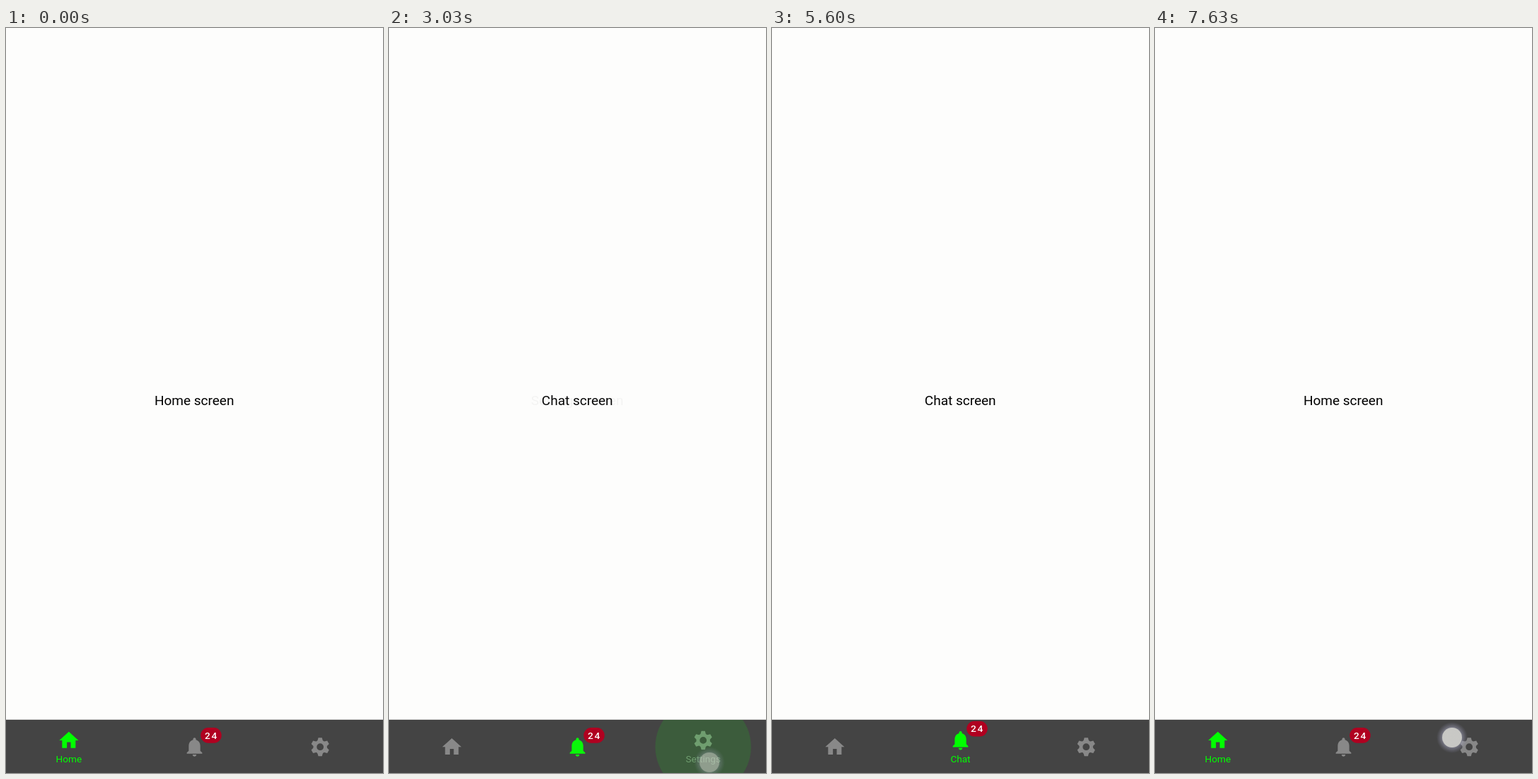
An HTML page for the animation above (7660 ms loop, 533 by 1051 pixels).

```html
<!DOCTYPE html>
<html lang="en">
<head>
<meta charset="utf-8">
<title>Bottom navigation</title>
<style>
  html, body { margin: 0; width: 100%; height: 100%; overflow: hidden; background: #fdfdfc; }
  svg { display: block; width: 533px; height: 1051px; font-family: Roboto, sans-serif; text-anchor: middle; }
  .screen { font-size: 19px; }
  .label { font-size: 13.57px; }
  .badge { font-size: 13.57px; font-weight: 500; letter-spacing: 1.7px; fill: #fff; text-anchor: start; }
</style>
</head>
<body>
<svg viewBox="0 0 533 1051">
  <defs>
    <clipPath id="bar"><rect y="976" width="533" height="75"/></clipPath>
    <radialGradient id="halo">
      <stop offset=".55" stop-color="#b4b4cc" stop-opacity=".6"/>
      <stop offset="1" stop-color="#9090b0" stop-opacity="0"/>
    </radialGradient>
    <path id="tooth" d="M10.1 2.4h3.8l.85 3-1 2h-3.5l-1-2z"/>
    <path id="icon0" d="M10 20v-6h4v6h5v-8h3L12 3 2 12h3v8z"/>
    <path id="icon1" d="M12 22c1.1 0 2-.9 2-2h-4c0 1.1.9 2 2 2zm6-6v-5c0-3.07-1.64-5.64-4.5-6.32V4c0-.83-.67-1.5-1.5-1.5s-1.5.67-1.5 1.5v.68C7.63 5.36 6 7.92 6 11v5l-2 2v1h16v-1z"/>
    <g id="icon2"><circle cx="12" cy="12" r="5.4" fill="none" stroke="currentColor" stroke-width="3.6"/></g>
  </defs>
  <g id="screens"></g>
  <rect y="975.8" width="533" height="76" fill="#444"/>
  <g id="tabs" fill="currentColor"></g>
  <g id="badge">
    <rect x="275.2" y="987" width="29.5" height="21.8" rx="10.9" fill="#b00020"/>
    <text class="badge" x="281" y="1002.8">24</text>
  </g>
  <circle id="ripple" cy="1014" fill="#0f0" clip-path="url(#bar)"/>
  <g id="touch">
    <circle r="22" fill="url(#halo)"/>
    <circle r="14" fill="#d2d2cc" fill-opacity=".88"/>
  </g>
</svg>
<script>
const LOOP = 7660, DP = 1.357;
// Delays after a press, in ms
const HOLD = 50, RIPPLE = 68, SELECT = 85;
const names = ['Home', 'Chat', 'Settings'];
const centers = [1, 3, 5].map(n => n * 533 / 6);
// Taps on a tab: press time, tab, finger position
const taps = [
  { at: 1600, tab: 1, x: 285, y: 1024 },
  { at: 2900, tab: 2, x: 453, y: 1036 },
  { at: 5030, tab: 1, x: 285, y: 1023 },
  { at: 5970, tab: 0, x: 100, y: 1023 }
];
// Every touch, including those that select nothing
const touches = [
  ...taps.map(tap => ({ ...tap, hold: HOLD })),
  { at: 7000, x: 420, y: 1001, hold: 200 },
  { at: 7630, x: 420, y: 1001, hold: 200 }
];

const $ = id => document.getElementById(id);
const clamp = v => Math.min(1, Math.max(0, v));
const mix = (a, b, p) => a + (b - a) * p;

// cubic-bezier(.4, 0, .2, 1)
function ease(x) {
  let lo = 0, hi = 1;
  for (let i = 0; i < 20; i++) {
    const s = (lo + hi) / 2;
    const bx = 1.2 * s * (1 - s) ** 2 + 0.6 * s * s * (1 - s) + s ** 3;
    if (bx < x) lo = s; else hi = s;
  }
  return 3 * lo * lo - 2 * lo ** 3;
}

for (let a = 0; a < 360; a += 60)
  $('icon2').innerHTML += `<use href="#tooth" transform="rotate(${a} 12 12)"/>`;
$('screens').innerHTML = names.map(n =>
  `<text class="screen" x="266.2" y="532">${n} screen</text>`).join('');
$('tabs').innerHTML = names.map((n, i) =>
  `<g><use href="#icon${i}"/><text class="label" x="${centers[i]}" y="1036">${n}</text></g>`).join('');

function draw(t) {
  const index = taps.findLastIndex(tap => t >= tap.at + SELECT);
  const current = index < 0 ? 0 : taps[index].tab;
  const previous = index < 1 ? 0 : taps[index - 1].tab;
  const since = index < 0 ? Infinity : t - taps[index].at - SELECT;
  const level = (i, duration) => {
    const p = ease(clamp(since / duration));
    return i === current ? p : i === previous ? 1 - p : 0;
  };

  names.forEach((_, i) => {
    $('screens').children[i].setAttribute('opacity', level(i, 400));
    const tab = $('tabs').children[i], [icon, label] = tab.children;
    const p = level(i, 300), grey = mix(136, 0, p);
    tab.style.color = `rgb(${grey}, ${mix(136, 255, p)}, ${grey})`;
    const y = i === current ? 1004.9 : 1014.2;
    icon.setAttribute('transform', `translate(${centers[i]} ${y}) scale(${DP}) translate(-12 -12)`);
    label.setAttribute('visibility', i === current ? 'visible' : 'hidden');
  });
  $('badge').setAttribute('transform', `translate(0 ${current === 1 ? -9.3 : 0})`);

  const pressed = taps.findLast(tap => t >= tap.at + RIPPLE);
  const age = pressed ? t - pressed.at - RIPPLE : Infinity;
  $('ripple').setAttribute('cx', centers[pressed ? pressed.tab : 0]);
  $('ripple').setAttribute('r', mix(53, 100, ease(clamp(age / 225))));
  $('ripple').setAttribute('opacity', 0.15 * clamp(age / 75) * clamp(1 - (age - 225) / 150));

  const touch = touches.findLast(p => t >= p.at);
  $('touch').setAttribute('opacity', touch ? clamp(1 - (t - touch.at - touch.hold) / 200) : 0);
  if (touch) $('touch').setAttribute('transform', `translate(${touch.x} ${touch.y})`);
}

const start = performance.now();
function tick() {
  draw((performance.now() - start) % LOOP);
  requestAnimationFrame(tick);
}
tick();
</script>
</body>
</html>
```
